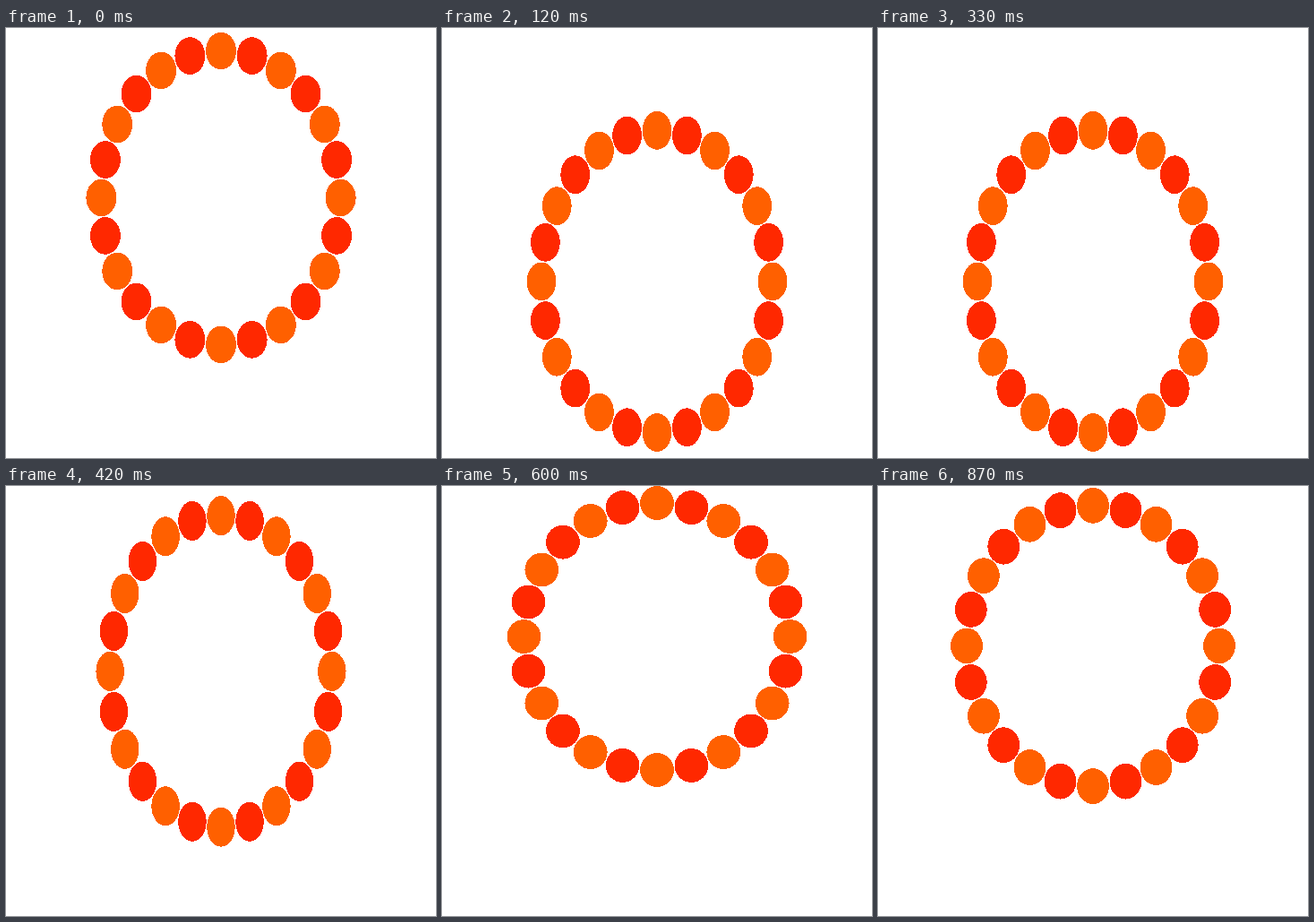
Animation, 480 px wide and 480 px high, one loop 900 ms. Source, as an HTML page:

```html
<!DOCTYPE html>
<html lang="en">
<head>
<meta charset="utf-8">
<title>Bouncing bead ring</title>
<style>
  html, body { margin: 0; width: 100%; height: 100%; overflow: hidden; background: #fff; }
  svg { display: block; width: 100vw; height: 100vh; }
</style>
</head>
<body>
<svg viewBox="0 0 480 480" shape-rendering="crispEdges"><g id="ring"></g></svg>
<script>
  const STEP = 30, POSES = 15, START = 7;
  const BEADS = 24, SIZE = 167.7, BEAD = 18.9;
  const ring = document.getElementById('ring');

  for (let i = 0; i < BEADS; i++) {
    const a = i / BEADS * 2 * Math.PI;
    const bead = document.createElementNS('http://www.w3.org/2000/svg', 'circle');
    bead.setAttribute('cx', (SIZE - BEAD) * Math.sin(a));
    bead.setAttribute('cy', -(SIZE - BEAD) * Math.cos(a));
    bead.setAttribute('r', BEAD);
    bead.setAttribute('fill', i % 2 ? '#ff2800' : '#ff6000');
    ring.append(bead);
  }

  const sCurve = (x, middle, rate) => 1 / (1 + Math.exp(rate * (middle - x)));

  // The bottom edge falls first and the top edge follows three steps later,
  // so the ring stretches on the way down and squashes on landing.
  function draw(time) {
    const k = (Math.floor(time / STEP) + START) % (POSES * 2);
    const pose = Math.min(k, POSES * 2 - 1 - k);
    const top = 210 * sCurve(pose, 11.26, 0.888);
    const bottom = 335.2 + 151.5 * sCurve(pose, 8.26, 0.84);
    const sy = (bottom - top) / 2 / SIZE;
    ring.setAttribute('transform',
      `translate(240 ${(top + bottom) / 2}) scale(${2 - sy} ${sy})`);
  }

  const start = performance.now();
  function tick() {
    draw(performance.now() - start);
    requestAnimationFrame(tick);
  }
  tick();
</script>
</body>
</html>
```
